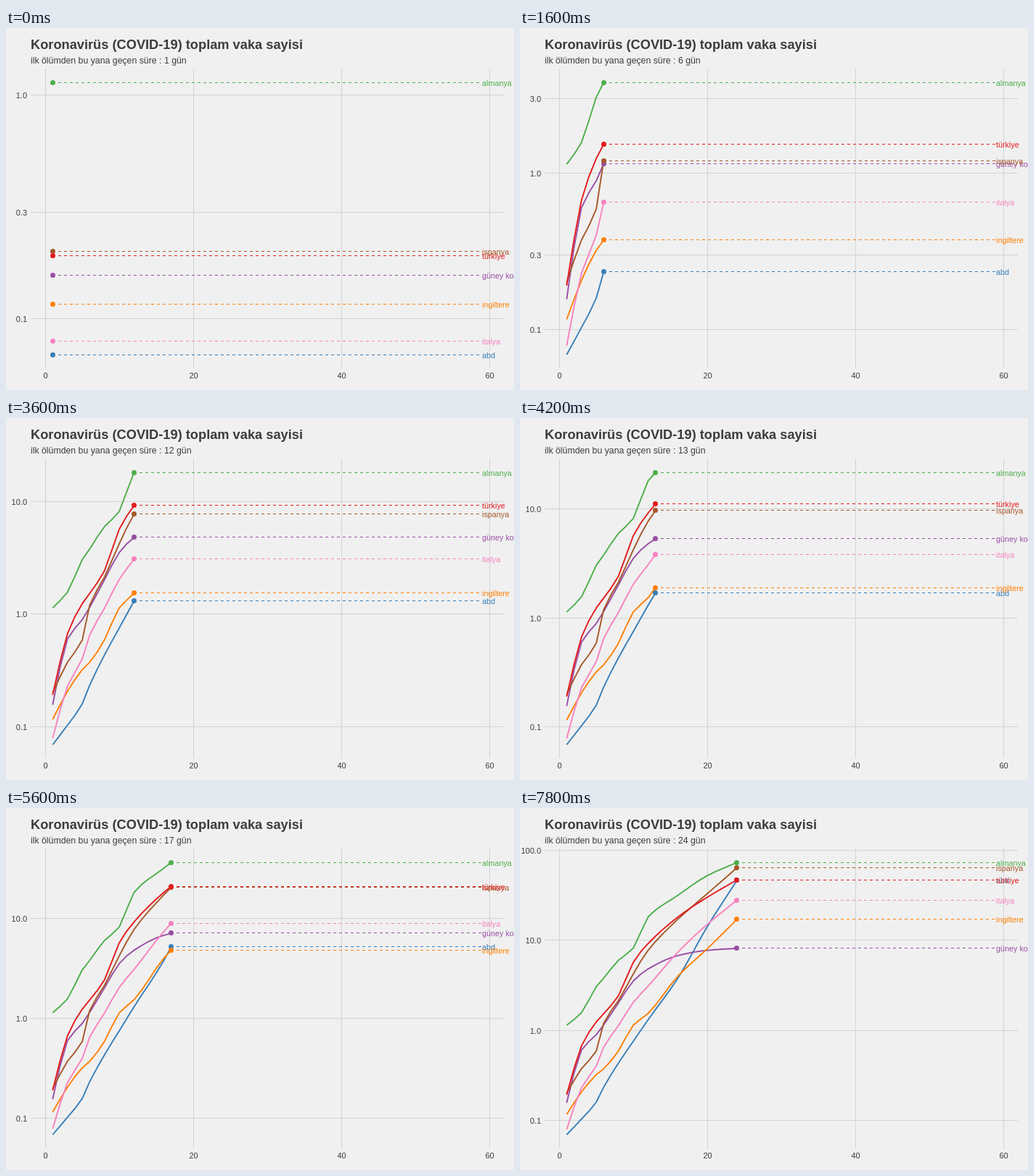
An HTML page with a canvas that plays this animation: 700x500 px, repeating every 8000 ms.

```html
<!DOCTYPE html>
<html lang="tr">
<head>
<meta charset="utf-8">
<title>Koronavirüs (COVID-19) toplam vaka sayisi</title>
<style>
html, body { margin: 0; width: 100%; height: 100%; overflow: hidden; background: #f0f0f0; }
canvas { display: block; }
</style>
</head>
<body>
<canvas id="stage" width="700" height="500"></canvas>
<script>
const ctx = document.getElementById("stage").getContext("2d");
const FONT = '"Liberation Sans", Arial, sans-serif';
const LOOP = 8000, STEP = 200, LAST_DAY = 59, STEPS = 99;
const PANEL = { left: 34, right: 686, top: 56, bottom: 470 };
const TOP = 75.25, HEIGHT = 376, DAY = 10.2, ZERO = 54.1, LABEL_X = 656;
const INK = "#3c3c3c", PAPER = "#f0f0f0", GRID = "#d2d2d2";

// Each curve passes through its thousands of cases on these days.
const KEY_DAYS = [1, 3, 5, 6, 8, 10, 12, 16, 20, 24];

const countries = [
  country("abd", "#377eb8", [.069, .103, .159, .233, .433, .754, 1.31, 3.77, 14.25, 46.4]),
  country("almanya", "#4daf4a", [1.14, 1.57, 3.06, 3.8, 6.01, 8.2, 18.2, 31.6, 52.5, 73.5]),
  country("güney kore", "#984ea3", [.156, .602, .893, 1.15, 2.02, 3.53, 4.81, 6.77, 7.75, 8.16]),
  country("ingiltere", "#ff7f00", [.116, .206, .321, .373, .59, 1.14, 1.54, 3.98, 8.08, 17.1]),
  country("ispanya", "#a65628", [.2, .374, .589, 1.2, 2.14, 4.23, 7.75, 17.1, 33.1, 64.1]),
  country("italya", "#f781bf", [.079, .229, .4, .65, 1.13, 2.04, 3.09, 7.37, 15.1, 28]),
  country("türkiye", "#e41a1c", [.191, .67, 1.24, 1.53, 2.43, 5.7, 9.22, 18.1, 30.2, 47])
];

function country(name, color, cases) {
  return { name, color, log: monotone(KEY_DAYS, cases.map(Math.log10)) };
}

// Monotone cubic interpolation with harmonic-mean slopes.
function monotone(xs, ys) {
  const secants = xs.slice(1).map((x, i) => (ys[i + 1] - ys[i]) / (x - xs[i]));
  const slopes = xs.map((_, i) => {
    const a = secants[i - 1] ?? secants[i], b = secants[i] ?? a;
    return 2 * a * b / (a + b);
  });
  return x => {
    const i = Math.max(0, xs.findIndex(k => k >= x) - 1);
    const h = xs[i + 1] - xs[i], t = (x - xs[i]) / h, u = 1 - t;
    return u * u * ((1 + 2 * t) * ys[i] + t * h * slopes[i])
      + t * t * ((1 + 2 * u) * ys[i + 1] - u * h * slopes[i + 1]);
  };
}

const xOf = day => ZERO + DAY * day;
const crisp = v => Math.floor(v) + .5;

function text(str, x, y, size, color = INK, align = "left", weight = "") {
  ctx.font = `${weight} ${size}px ${FONT}`;
  ctx.textAlign = align;
  ctx.fillStyle = color;
  ctx.fillText(str, x, y);
}

function line(x1, y1, x2, y2, color, dash = []) {
  ctx.setLineDash(dash);
  ctx.strokeStyle = color;
  ctx.lineWidth = 1;
  ctx.beginPath();
  ctx.moveTo(x1, y1);
  ctx.lineTo(x2, y2);
  ctx.stroke();
  ctx.setLineDash([]);
}

// Whole decades when three are in view, otherwise 1-3-10 steps.
function breaks(low, high) {
  const decades = [-1, 0, 1, 2].map(e => 10 ** e);
  const inView = v => Math.log10(v) >= low && Math.log10(v) <= high;
  const whole = decades.filter(inView);
  return whole.length > 2 ? whole : decades.flatMap(v => [v, 3 * v]).filter(inView);
}

function draw(day) {
  const low = Math.min(...countries.map(c => c.log(1)));
  const high = Math.max(...countries.map(c => c.log(day)));
  const span = high - low, pad = span * .05;
  const yOf = log => TOP + (high - log) / span * HEIGHT;

  ctx.fillStyle = PAPER;
  ctx.fillRect(0, 0, 700, 500);

  for (const v of breaks(low - pad, high + pad)) {
    const y = crisp(yOf(Math.log10(v)));
    line(PANEL.left, y, PANEL.right, y, GRID);
    text(v.toFixed(1), 29, y + 4.5, 11, INK, "right");
  }
  for (const d of [0, 20, 40, 60]) {
    const x = crisp(xOf(d));
    line(x, PANEL.top, x, PANEL.bottom, GRID);
    text(d, x, 484, 11, INK, "center");
  }

  ctx.lineJoin = "round";
  for (const c of countries) {
    ctx.strokeStyle = c.color;
    ctx.lineWidth = 1.9;
    ctx.beginPath();
    for (let d = 1; d <= day; d++) ctx.lineTo(xOf(d), yOf(c.log(d)));
    ctx.stroke();
  }

  const x = xOf(day);
  const heads = countries.map(c => ({ ...c, y: crisp(yOf(c.log(day)) - .2) }));
  for (const h of heads) line(Math.floor(x), h.y, LABEL_X, h.y, h.color, [4, 4]);
  for (const h of heads) {
    ctx.fillStyle = h.color;
    ctx.beginPath();
    ctx.arc(crisp(x), h.y, 3.5, 0, 2 * Math.PI);
    ctx.fill();
  }
  for (const h of heads) text(h.name, LABEL_X, h.y + 4.5, 10.8, h.color);

  text("Koronavirüs (COVID-19) toplam vaka sayisi", 34, 29, 18.24, INK, "left", "bold");
  text(`ilk ölümden bu yana geçen süre : ${day} gün`, 34, 49, 12.3);
}

const start = performance.now();
function tick() {
  const t = Math.max(0, performance.now() - start) % LOOP;
  const step = Math.floor(t / STEP);
  draw(Math.round(1 + step * (LAST_DAY - 1) / STEPS));
  requestAnimationFrame(tick);
}
tick();
</script>
</body>
</html>
```
